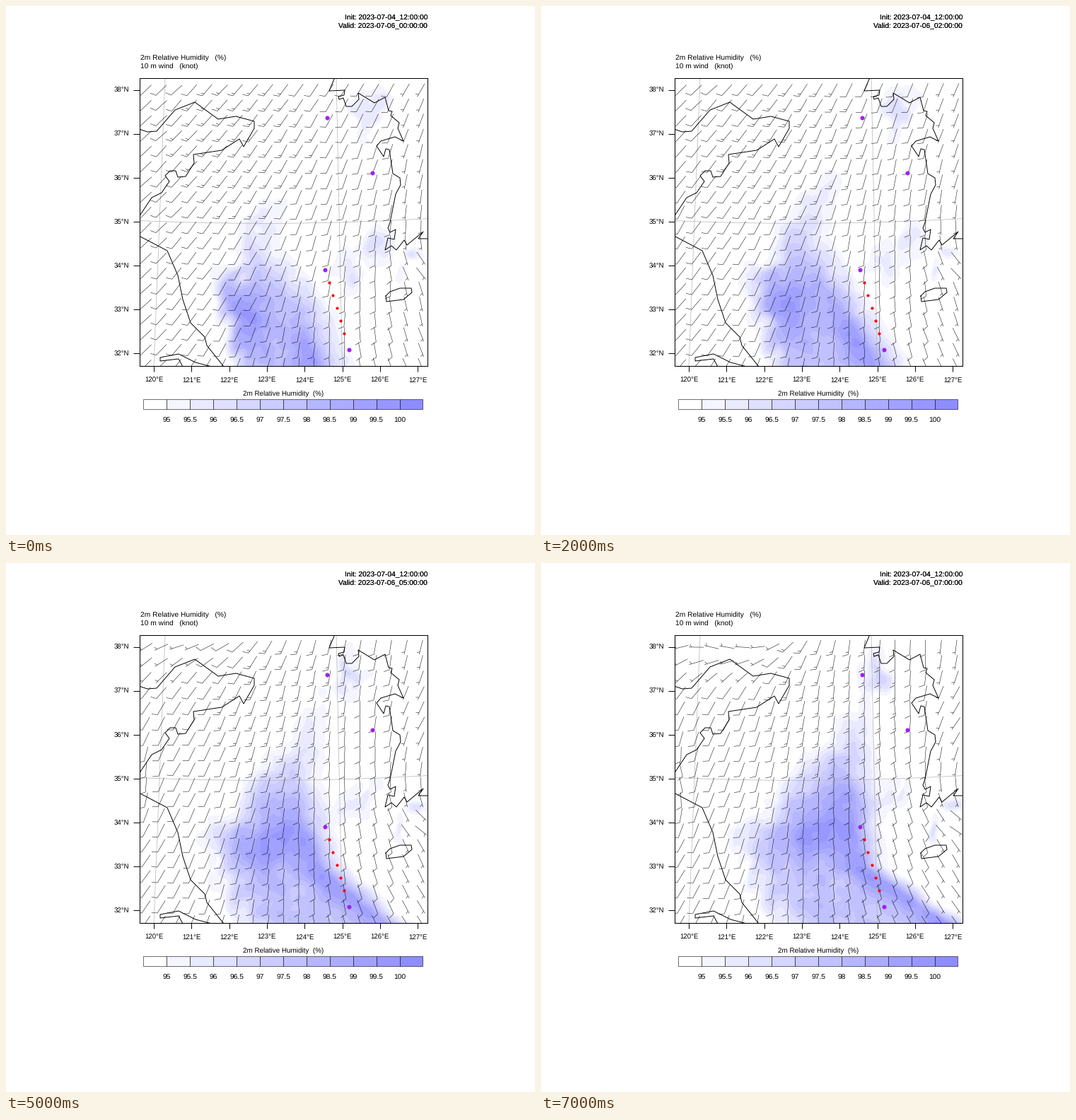
A matplotlib script that plays this animation: 748 px wide and 748 px high, repeating every 8 s.

```python
import numpy as np
import matplotlib.pyplot as plt
from matplotlib.animation import ArtistAnimation
from matplotlib.collections import LineCollection
from matplotlib.patches import Rectangle

SIZE = 748
HOURS = 8
LEFT, RIGHT, TOP, BOTTOM = 188.5, 595.5, 101.5, 509
PX = 0.72  # points per pixel at 100 dpi

plt.rcParams["font.family"] = "Liberation Sans"
plt.rcParams["text.hinting"] = "none"
SHADES = [((255 - 10.4 * i) / 255, (255 - 10.4 * i) / 255, 1) for i in range(12)]
rng = np.random.default_rng(12)

fig = plt.figure(figsize=(SIZE / 100, SIZE / 100), dpi=100, facecolor="white")
page = fig.add_axes([0, 0, 1, 1])
page.set(xlim=(0, SIZE), ylim=(SIZE, 0))
page.axis("off")
chart = fig.add_axes([LEFT / SIZE, 1 - BOTTOM / SIZE,
                      (RIGHT - LEFT) / SIZE, (BOTTOM - TOP) / SIZE])


def label(x, y, text, size=10.3, **kw):
    return page.text(x, y, text, fontsize=size * PX, **kw)


# ---- page furniture -------------------------------------------------------
def draw_page():
    for _ in range(2):
        label(596, 19, "Init: 2023-07-04_12:00:00", ha="right")
    label(190, 76.3, "2m Relative Humidity   (%)")
    label(190, 88.2, "10 m wind   (knot)")
    label(392, 551.3, "2m Relative Humidity  (%)", 9.9, ha="center")

    step = 395 / 12
    for i, shade in enumerate(SHADES):
        page.add_patch(Rectangle((194.5 + i * step, 556), step, 14, fc=shade,
                                 ec="black", lw=0.4))
        if i:
            label(194.5 + i * step, 588.5, f"{94.5 + i / 2:g}", ha="center")


def draw_axes():
    chart.set_xticks([209 + 53.3 * i for i in range(8)],
                     [f"{120 + i}°E" for i in range(8)])
    chart.set_yticks([118.7 + 62.05 * i for i in range(7)],
                     [f"{38 - i}°N" for i in range(7)])
    chart.tick_params(labelsize=9.6 * PX, width=0.7)
    chart.tick_params(axis="x", length=6, pad=5.2)
    chart.tick_params(axis="y", length=6.8, pad=3.3)
    for spine in chart.spines.values():
        spine.set_linewidth(0.75)
    grid = dict(color="#b4b4b4", lw=0.5, zorder=2)
    chart.plot([225, 209], [TOP, BOTTOM], **grid)
    chart.plot([467, 475.5], [TOP, BOTTOM], **grid)
    x = np.linspace(LEFT, RIGHT, 40)
    chart.plot(x, 307.3 - 1.25e-4 * (x - 380) ** 2 + 0.004 * (380 - x), **grid)


# ---- coastlines -----------------------------------------------------------
NORTH_CAPE = [
    (188, 174), (200, 178), (213, 177), (239, 147), (267, 136), (300, 160),
    (325, 156), (351, 163), (351, 173), (336, 199), (330, 188), (305, 204),
    (265, 210), (266, 222), (254, 241), (243, 242), (240, 233), (232, 233),
    (225, 240), (231, 248), (220, 264), (206, 271), (188, 298)]
WEST_SHORE = [
    (188, 325), (228, 346), (243, 381), (250, 415), (261, 448), (281, 468),
    (284, 480), (308, 510)]
RIVER_MOUTH = [
    (250, 510), (244, 499), (218, 502), (218, 497), (244, 492), (268, 504),
    (291, 510)]
EAST_SHORE = [
    (465, 101), (457, 120), (479, 119), (478, 126), (470, 128), (471, 132),
    (477, 130), (481, 142), (489, 142), (499, 132), (498, 123), (521, 137),
    (536, 129), (541, 148), (546, 149), (544, 155), (556, 165), (554, 173),
    (562, 191), (550, 185), (530, 191), (524, 198), (534, 213), (537, 202),
    (542, 203), (547, 237), (557, 243), (558, 253), (551, 266), (543, 306),
    (540, 314), (543, 320), (551, 316), (549, 330), (540, 328), (536, 345),
    (545, 339), (552, 345), (563, 331), (567, 338), (590, 319), (583, 329),
    (597, 329)]
ISLAND = [(537, 410), (543, 404), (557, 399), (573, 399), (574, 405),
          (562, 415), (538, 418), (537, 410)]


def draw_coast():
    for shore in (NORTH_CAPE, WEST_SHORE, RIVER_MOUTH, EAST_SHORE, ISLAND):
        chart.plot(*zip(*shore), color="black", lw=0.7, zorder=4)
    chart.scatter([454, 517.5, 451, 485], [157.5, 236, 373, 486], s=19,
                  color="#a020f0", lw=0, zorder=5)
    track = np.arange(5)
    chart.scatter(457 + 5.3 * track, 391 + 18 * track, s=9,
                  color="red", lw=0, zorder=5)


# ---- humidity -------------------------------------------------------------
gx, gy = np.meshgrid(np.arange(LEFT - 10, RIGHT + 12, 2),
                     np.arange(TOP - 10, BOTTOM + 12, 2))


def mix(a, b, f):
    return np.asarray(a) * (1 - f) + np.asarray(b) * f


def blur(field, sigma):
    r = int(3 * sigma) + 1
    k = np.exp(-0.5 * (np.arange(-r, r + 1) / sigma) ** 2)
    k /= k.sum()
    for axis in (0, 1):
        pad = [(r, r) if a == axis else (0, 0) for a in (0, 1)]
        field = np.apply_along_axis(np.convolve, axis,
                                    np.pad(field, pad, mode="wrap"), k, "valid")
    return field


def texture(sigma):
    noise = blur(rng.standard_normal(gx.shape), sigma)
    return noise / noise.std()


GRAIN = 0.2 * texture(1.8) + 0.4 * texture(4.5)
WARP = 5 * texture(4) + 6 * texture(9)

# West and east edge of the plume on these rows, at the first and last hour.
ROWS = [130, 200, 270, 330, 380, 430, 509]
WEST = [430, 405, 360, 320, 280, 290, 308], [452, 436, 372, 318, 252, 264, 316]
EAST = [450, 440, 408, 398, 428, 472, 498], [472, 474, 476, 478, 482, 496, 612]

# Local patches: centre and strength at the first and last hour, then radii.
PATCHES = [
    ((510, 152, 2.2), (479, 155, 4.0), (13, 32)),
    ((514, 338, 3.0), (492, 328, 1.8), (18, 24)),
    ((478, 375, 2.2), (474, 340, 1.2), (18, 28)),
    ((580, 351, 4.0), (594, 342, 3.0), (17, 8)),
    ((555, 376, 1.6), (551, 376, 2.8), (7, 17)),
    ((330, 387, -2.5), (285, 435, -3.0), (9, 14)),
    ((486, 318, -0.5), (488, 320, -3.0), (4, 12)),
]


def bump(x, y, x0, y0, rx, ry):
    return np.exp(-((x - x0) / rx) ** 2 - ((y - y0) / ry) ** 2)


def ease(a):
    a = np.clip(a, 0, 1)
    return a * a * (3 - 2 * a)


def humidity(t):
    """Number of half-percent steps above 94.5 % on the grid."""
    f = t / 7
    west = np.interp(gy, ROWS, mix(*WEST, f))
    east = np.interp(gy, ROWS, mix(*EAST, f))
    tip = 268 - 138 * f
    x = gx + WARP
    inside = np.clip(np.minimum.reduce([
        (x - west) / (34 + 36 * f),
        (east - gx - WARP * 0.3) / (62 - 22 * f),
        (gy - tip) / 40]), 0, 1)
    body = 2.8 + 2.9 * ease((gy - mix(320, 210, f)) / 100)

    west_core = 3.6 * bump(x, gy, *mix((343, 440), (380, 385), f),
                           *mix((30, 58), (36, 42), f))
    ridge = bump(gx, 0, east - mix(64, 48, f), 0, 34, 1)
    east_core = 3.4 * ridge * ease((gy - mix(400, 260, f)) / 110)
    field = inside * (body + west_core + east_core)
    for first, last, radii in PATCHES:
        x0, y0, strength = mix(first, last, f)
        field += strength * bump(x, gy, x0, y0, *radii)
    field += 3 * np.exp(-2 * (t - 3) ** 2) * bump(gx, gy, 192, 427, 7, 6)
    grain = np.roll(GRAIN, (-3 * t, 2 * t), axis=(0, 1))
    return field + grain * np.clip(field, 0, 1.2) * 0.7


def draw_humidity(t):
    levels = np.append(np.arange(0.5, 11), 20)
    return chart.contourf(gx, gy, humidity(t), levels=levels,
                          colors=SHADES[1:], zorder=1)


# ---- wind -----------------------------------------------------------------
bx, by = (a.ravel() for a in np.meshgrid(198 + 21.6 * np.arange(19),
                                         119 + 21.6 * np.arange(19)))
u = (bx - LEFT) / (RIGHT - LEFT)
v = (by - TOP) / (BOTTOM - TOP)
sway = rng.normal(0, 2, bx.size)


def wind(t):
    """Heading in radians and speed in steps of five knots."""
    f = t / 7
    heading = (42 + 16 * f + (20 + 20 * f) * u + (55 - 23 * f) * u * v
               - 85 * f ** 2 * bump(u, v, 0.18, 0, 0.22, 0.14)
               + 45 * f * bump(u, v, 0, 0.5, 0.08, 0.15)
               - 50 * f * bump(u, v, 1, 0.3, 0.14, 0.22)
               + 40 * bump(u, v, 1, 0.66, 0.09, 0.06) + sway)
    speed = (9 + 7 * bump(u, v, 0.37 + 0.17 * f, 0.24, 0.3, 0.3)
             - 3 * (u > 0.88) - 5 * f * ((v < 0.2) & (u < 0.38)))
    return np.radians(heading), np.round(speed / 5)


def draw_barbs(t):
    heading, halves = wind(t)
    ahead = np.column_stack([np.cos(heading), -np.sin(heading)])
    side = np.column_stack([-np.sin(heading), -np.cos(heading)])
    feather = 0.9 * side - 0.42 * ahead
    centre = np.column_stack([bx, by])
    tail = centre - 10.5 * ahead
    lines = list(np.stack([tail, centre + 10.5 * ahead], 1))
    for p, a, d, n in zip(tail, ahead, feather, halves):
        if n >= 2:
            lines.append([p, p + 8.5 * d])
        if n % 2:
            root = p + 3.6 * a
            lines.append([root, root + 4.4 * d])
    barbs = LineCollection(lines, colors="black", linewidths=0.36, zorder=3)
    return chart.add_collection(barbs, autolim=False)


def scene(t):
    stamp = f"Valid: 2023-07-06_{t:02d}:00:00"
    clock = [label(596, 31.3, stamp, ha="right") for _ in range(2)]
    return [draw_humidity(t), draw_barbs(t), *clock]


draw_page()
draw_axes()
draw_coast()
scenes = [scene(t) for t in range(HOURS)]
chart.set(xlim=(LEFT, RIGHT), ylim=(BOTTOM, TOP))
anim = ArtistAnimation(fig, scenes, interval=1000, repeat=True, repeat_delay=0)
plt.show()
```
